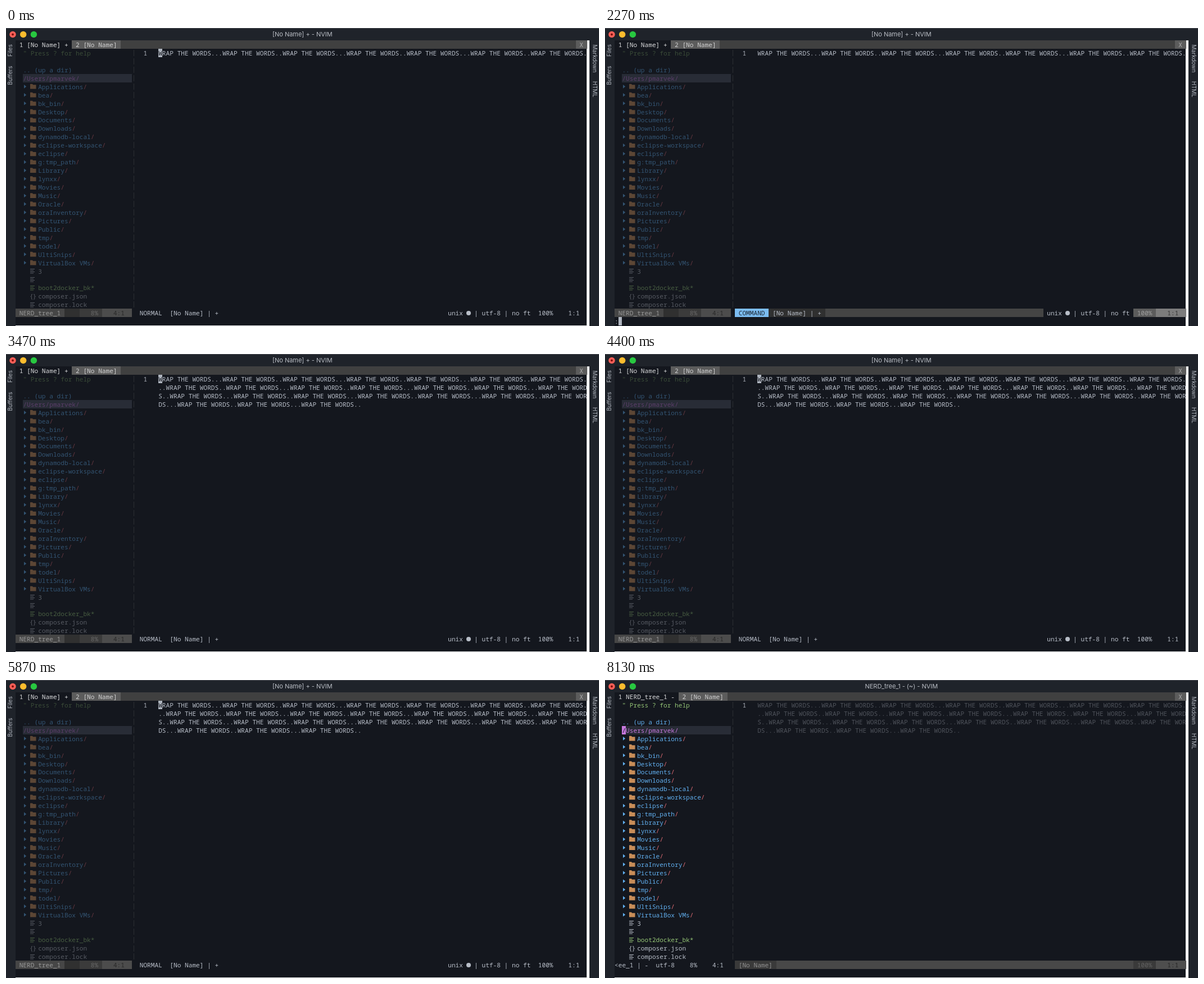
Recreate the animation shown at these times as an HTML page with a canvas. Size 1055 px wide and 531 px high, loop 8190 ms.

```html
<!DOCTYPE html>
<html lang="en">
<head>
<meta charset="utf-8">
<title>Wrap the words</title>
<style>
  html, body { margin: 0; width: 100%; height: 100%; overflow: hidden; background: #14171e; }
  canvas { display: block; }
</style>
</head>
<body>
<canvas id="stage" width="1055" height="531"></canvas>
<script>
const ctx = document.getElementById('stage').getContext('2d');
const LOOP = 8190;
const LEFT = 17, TOP = 22, CELL = 6.689, ROW = 14.95;
const MONO = '11.15px "Noto Sans Mono", "DejaVu Sans Mono", monospace';
const UI = 'Inter, "Open Sans", sans-serif';

const BG = [20, 23, 30];
const FG = [184, 190, 200], BLUE = [97, 175, 239], RED = [224, 108, 117];
const GREEN = [147, 195, 117], PURPLE = [198, 120, 221], TAN = [200, 141, 88];
const DIM = 0.4;

const COMMAND = ':set wrap';
const KEYS = [2130, 2330, 2400, 2470, 2600, 2730, 2800, 2870, 3000];
const ENTER = 3330, SWITCH = 6330;

const WORDS = 'WRAP THE WORDS...WRAP THE WORDS..'.repeat(12);
const LINE = 114;
const DIRS = ['Applications', 'bea', 'bk_bin', 'Desktop', 'Documents', 'Downloads',
  'dynamodb-local', 'eclipse-workspace', 'eclipse', 'g:tmp_path', 'Library', 'lynxx',
  'Movies', 'Music', 'Oracle', 'oraInventory', 'Pictures', 'Public', 'tmp', 'todel',
  'UltiSnips', 'VirtualBox VMs'];
const FILES = ['3', '', 'boot2docker_bk*', 'composer.json', 'composer.lock'];

const colX = c => LEFT + c * CELL;
const rowY = r => TOP + r * ROW;
const css = (c, a = 1) =>
  `rgb(${c.map((v, i) => Math.round(BG[i] + (v - BG[i]) * a)).join(',')})`;

function rect(x, y, w, h, color) {
  ctx.fillStyle = color;
  ctx.fillRect(x, y, w, h);
}

function dot(x, y, r, color) {
  ctx.fillStyle = color;
  ctx.beginPath();
  ctx.arc(x, y, r, 0, 7);
  ctx.fill();
}

function shape(points, color) {
  ctx.fillStyle = color;
  ctx.beginPath();
  points.forEach(([x, y]) => ctx.lineTo(x, y));
  ctx.fill();
}

// Fill terminal cells from column a up to column b.
function cells(row, a, b, color) {
  const x = Math.round(colX(a)), y = Math.round(rowY(row));
  rect(x, y, Math.round(colX(b)) - x, Math.round(rowY(row + 1)) - y, color);
}

function put(row, col, text, color) {
  ctx.font = MONO;
  ctx.textAlign = 'left';
  ctx.textBaseline = 'alphabetic';
  ctx.fillStyle = color;
  const y = Math.round(rowY(row) + 11.9);
  [...text].forEach((ch, i) => {
    if (ch !== ' ') ctx.fillText(ch, colX(col + i), y);
  });
}

function label(text, x, y, turn, size, color) {
  ctx.save();
  ctx.translate(x, y);
  ctx.rotate(turn * Math.PI / 2);
  ctx.font = `${size}px ${UI}`;
  ctx.textAlign = 'center';
  ctx.textBaseline = 'middle';
  ctx.fillStyle = color;
  ctx.fillText(text, 0, 0);
  ctx.restore();
}

function drawFrame(inTree, typing) {
  rect(0, 0, 1055, 531, css(BG));
  rect(0, 0, 1055, 22, '#1f232a');
  rect(0, 0, 1055, 1, '#4b4e54');
  rect(0, 22, 17, 509, '#1f232a');
  rect(1038, 22, 17, 509, '#1f232a');
  rect(1033, 22, 5, 509, '#fafafa');
  if (!typing) rect(17, 530, 1016, 1, '#f4f4f4');

  ['#ff5f57', '#febc2e', '#28c840'].forEach((c, i) => dot(12 + i * 18.7, 11.5, 5.7, c));
  dot(12, 11.5, 1.9, '#7a0f0c');
  label(inTree ? 'NERD_tree_1 - (~) - NVIM' : '[No Name] + - NVIM', 527.3, 12, 0, 11, '#b9bdc4');
  label('Files', 8, 40, -1, 10, '#b4b9c2');
  label('Buffers', 8, 84.5, -1, 10, '#b4b9c2');
  label('Markdown', 1047, 54.5, 1, 10, '#b4b9c2');
  label('HTML', 1047, 109, 1, 10, '#b4b9c2');
}

function drawTabs(inTree) {
  const first = inTree ? '1 NERD_tree_1 -' : '1 [No Name] +';
  const end = first.length + 2;
  cells(0, 0, 152, '#404040');
  cells(0, 0, end, css(BG));
  cells(0, end, end + 13, '#5c5c5c');
  cells(0, 149, 152, '#5c5c5c');
  put(0, 1, first, '#d8d9da');
  put(0, end + 1, '2 [No Name]', '#d0d0d0');
  put(0, 150, 'X', '#b0b0b0');
}

function folder(y, color) {
  shape([[43, y - 4.5], [47, y - 4.5], [48.2, y - 3], [53.5, y - 3],
    [53.5, y + 4.2], [43, y + 4.2]], color);
}

function drawTree(active) {
  const tone = c => css(c, active ? 1 : DIM);
  put(1, 2, '" Press ? for help', css(GREEN, active ? 1 : 0.3));
  put(3, 2, '.. (up a dir)', tone(BLUE));
  cells(4, 2, 31, '#282c36');
  put(4, 2, '/Users/pmarvek/', tone(PURPLE));
  if (active) {
    cells(4, 2, 3, css(PURPLE));
    put(4, 2, '/', css(BG));
  }

  DIRS.forEach((name, i) => {
    const row = 5 + i, y = rowY(row) + 7.6;
    shape([[32, y - 3.3], [36.2, y], [32, y + 3.3]], tone(BLUE));
    folder(y, tone(TAN));
    put(row, 6, name, tone(BLUE));
    put(row, 6 + name.length, '/', tone(RED));
  });

  FILES.forEach((name, i) => {
    const row = 27 + i, y = Math.round(rowY(row) + 7.5);
    const color = tone(name.endsWith('*') ? GREEN : FG);
    if (name.endsWith('.json')) {
      put(row, 3.75, '{', color);
      put(row, 4.55, '}', color);
    } else {
      for (let k = 0; k < 4; k++) rect(43, y - 4 + k * 2.5, k % 2 ? 6 : 8, 1, color);
    }
    put(row, 6, name, color);
  });

  for (let r = 1; r < 32; r++) rect(227, Math.round(rowY(r) + 2), 1, 11, '#2b2e34');
}

function drawText(wrapped, active, cursor) {
  put(1, 34, '1', '#adb2bb');
  const rows = wrapped ? Math.ceil(WORDS.length / LINE) : 1;
  for (let r = 0; r < rows; r++) {
    put(1 + r, 38, WORDS.substr(r * LINE, LINE), css(FG, active ? 1 : 0.36));
  }
  if (cursor) {
    cells(1, 38, 39, '#b0b6c0');
    put(1, 38, 'W', css(BG));
  }
}

function drawTreeStatus(active) {
  const row = 32;
  if (active) {
    put(row, 0, '<ee_1 | -  utf-8', css(FG));
    put(row, 20, '8%', css(FG));
    put(row, 26, '4:1', css(FG));
    return;
  }
  cells(row, 0, 13, '#464646');
  cells(row, 13, 17, '#303030');
  cells(row, 17, 23, '#3b3b3b');
  cells(row, 23, 31, '#4c4c4c');
  put(row, 1, 'NERD_tree_1', '#999');
  put(row, 20, '8%', '#686868');
  put(row, 26, '4:1', '#292929');
}

function drawTextStatus(inTree, typing) {
  const row = 32, light = css(FG);
  if (inTree) {
    cells(row, 32, 43, '#3a3a3a');
    cells(row, 43, 138, '#484848');
    cells(row, 138, 144, '#3a3a3a');
    cells(row, 144, 152, '#4e4e4e');
    put(row, 33, '[No Name]', '#909090');
    put(row, 139, '100%', '#626262');
    put(row, 147, '1:1', '#282828');
    return;
  }
  if (typing) {
    cells(row, 32, 41, '#7cbdf2');
    cells(row, 41, 56, '#303030');
    cells(row, 56, 114, '#444');
    cells(row, 138, 144, '#5c5c5c');
    cells(row, 144, 152, '#7c7c7c');
    put(row, 33, 'COMMAND', '#1b2733');
  } else {
    put(row, 33, 'NORMAL', light);
  }
  put(row, typing ? 42 : 41, '[No Name] | +', light);
  put(row, 115, 'unix', light);
  dot(823, rowY(row) + 7.6, 4, light);
  put(row, 122, '| utf-8 | no ft', light);
  put(row, 139, '100%', typing ? '#a0a0a0' : light);
  put(row, 147, '1:1', typing ? '#343434' : light);
}

function draw(t) {
  const inTree = t >= SWITCH;
  const typing = t >= KEYS[0] && t < ENTER;
  drawFrame(inTree, typing);
  drawTabs(inTree);
  drawTree(inTree);
  drawText(t >= ENTER, !inTree, !inTree && !typing);
  drawTreeStatus(inTree);
  drawTextStatus(inTree, typing);
  if (typing) {
    const count = KEYS.filter(k => k <= t).length;
    put(33, 0, COMMAND.slice(0, count), css(FG));
    cells(33, count, count + 1, '#b0b6c0');
  }
}

function tick() {
  draw(performance.now() % LOOP);
  requestAnimationFrame(tick);
}
tick();
</script>
</body>
</html>
```
